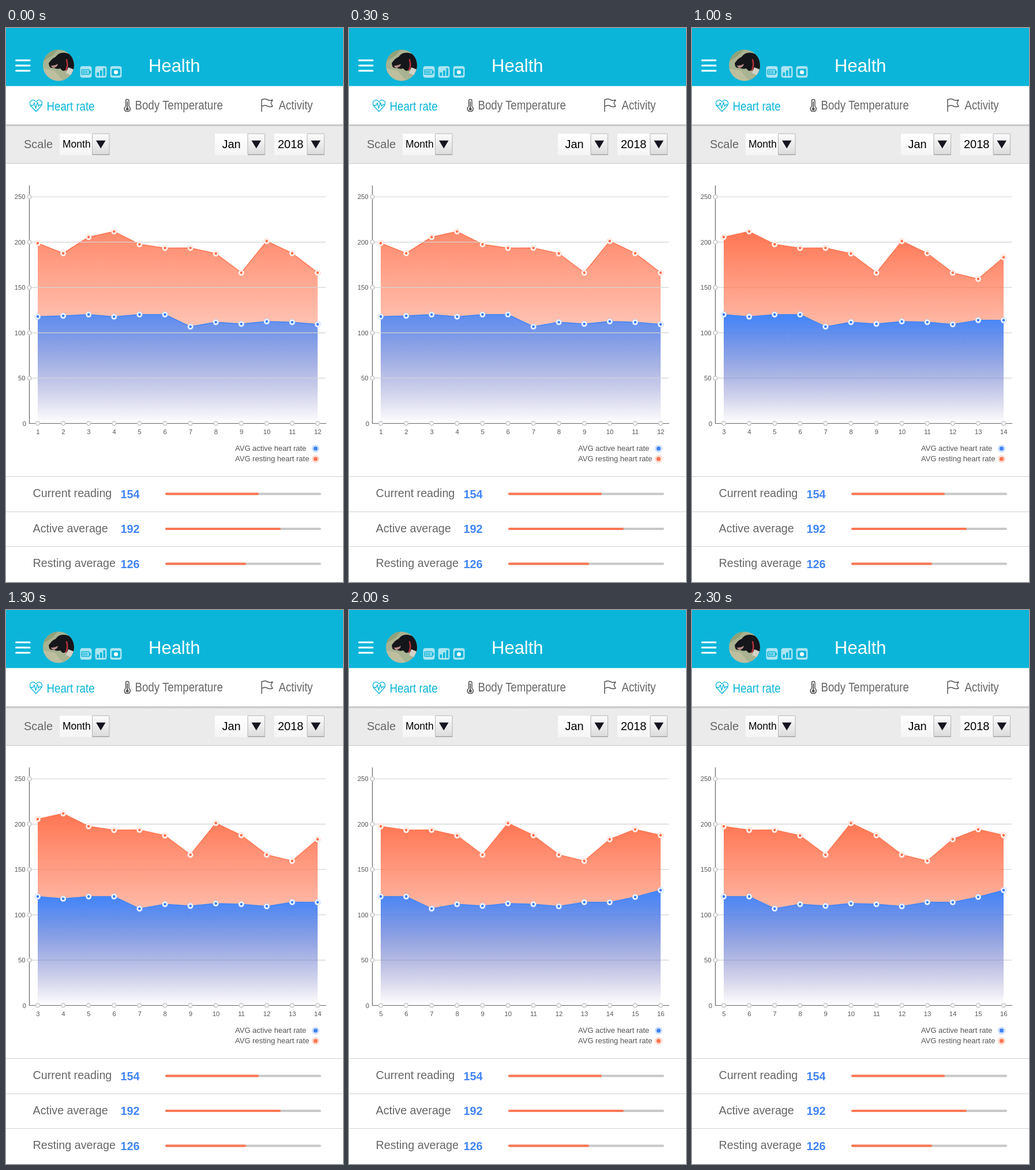
An HTML page for the animation above (2.5 s loop, 584x959 px).

```html
<!DOCTYPE html>
<html lang="en">
<head>
<meta charset="utf-8">
<title>Health</title>
<style>
  html, body { margin: 0; width: 100%; height: 100%; overflow: hidden; background: #fff; }
  svg { display: block; width: 584px; height: 959px; }
  text { font-family: "Liberation Sans", Arial, sans-serif; }
  .line { fill: none; stroke-linecap: round; stroke-linejoin: round; }
  .small { font-size: 11.3px; fill: #555; }
  .mid { text-anchor: middle; }
  .end { text-anchor: end; }
  .tab { font-size: 22px; fill: #666; }
  .legend { font-size: 13px; fill: #555; }
  .label { font-size: 19.7px; fill: #666; }
  .value { font-size: 19.8px; font-weight: bold; fill: #4285f4; }
</style>
</head>
<body>
<svg viewBox="0 0 584 959">
  <defs>
    <linearGradient id="rest" x2="0" y2="1">
      <stop stop-color="#ff7653"/><stop offset="1" stop-color="#ff7653" stop-opacity="0"/>
    </linearGradient>
    <linearGradient id="act" x2="0" y2="1">
      <stop stop-color="#4285fb"/><stop offset="1" stop-color="#4285fb" stop-opacity="0"/>
    </linearGradient>
    <linearGradient id="field" x2="0" y2="1">
      <stop stop-color="#fff"/><stop offset="1" stop-color="#f5f5f5"/>
    </linearGradient>
    <linearGradient id="button" x2="0" y2="1">
      <stop stop-color="#fcfcfc"/><stop offset="1" stop-color="#dcdcdc"/>
    </linearGradient>
    <linearGradient id="shade" x2="0" y2="1">
      <stop stop-color="#b4b4b4"/><stop offset="1" stop-color="#ebebeb"/>
    </linearGradient>
    <clipPath id="round"><circle cx="91" cy="64.5" r="27"/></clipPath>
  </defs>

  <!-- header -->
  <rect width="584" height="100.5" fill="#0bb5d9"/>
  <path d="M17.5 56H41M17.5 65H41M17.5 74H41" class="line" stroke="#fff" stroke-width="3"/>
  <g clip-path="url(#round)">
    <rect x="64" y="37" width="54" height="55" fill="#a9b391"/>
    <path d="M64 37H90L80 48L64 58Z" fill="#8fa27a"/>
    <path d="M64 70L84 74L100 92H64Z" fill="#bdbf9f"/>
    <path d="M74 61Q80 52 86 50Q92 41 103 43Q114 45 119 54V80Q110 79 105 71Q100 78 94 70Q88 72 83 69Q77 70 75 66Z" fill="#15161a"/>
    <path d="M77 65Q84 66 90 62Q89 69 81 69Z" fill="#b58c88"/>
    <path d="M105 55Q108 65 104 73" class="line" stroke="#b8343b" stroke-width="2.5"/>
    <path d="M108 68L118 72V84L104 78Z" fill="#d3d2c6"/>
  </g>
  <g fill="#a9e4f1">
    <rect x="128.5" y="66" width="20" height="20" rx="4"/>
    <rect x="154.5" y="66" width="20" height="20" rx="4"/>
    <rect x="180.5" y="66" width="20" height="20" rx="4"/>
  </g>
  <g fill="#0bb5d9">
    <rect x="130.5" y="71.5" width="14.5" height="9.5" rx="1.5"/>
    <rect x="145" y="74" width="1.8" height="4.5"/>
    <path d="M157.5 77h3.5v6h-3.5zM163 73.5h3.5v9.5h-3.5zM168.5 69.5h3.5v13.500h-3.500z"/>
    <rect x="183" y="70.500" width="15" height="12" rx="2"/>
  </g>
  <rect x="132" y="73" width="11.5" height="6.5" fill="#a9e4f1"/>
  <path d="M134 74v4.500M137 74v4.500M140 74v4.500" stroke="#0bb5d9" stroke-width="1.7"/>
  <circle cx="190.500" cy="76.500" r="3.600" fill="#fff"/>
  <text x="247" y="76" font-size="31" fill="#fff">Health</text>

  <!-- tabs -->
  <g class="line" stroke="#0bb5d9" stroke-width="1.300">
    <path d="M52 144.500L43.500 135.500Q39.500 130 43 126.500Q48 122 52 128Q56 122 61 126.500Q64.500 130 60.500 135.500Z"/>
    <path d="M42 134H47L49 129.500L51.500 139L54.500 128.500L56.500 135.500L58 133H62"/>
  </g>
  <g class="line" stroke="#555" stroke-width="1.500">
    <path d="M207.500 135.500V126Q207.500 123.500 210.200 123.500T213 126V135.500Q215.500 137.500 215.300 140.500Q214.500 144.500 210.200 144.500T205.200 140.500Q205 137.500 207.500 135.500Z"/>
    <path d="M210.200 128V138" stroke-width="1.800"/>
    <path d="M443 124V144.500M443 124.500Q448 121.500 452.500 124T462 124.500L459 130L462 135.500Q457 137.500 452.500 135T443 136"/>
  </g>
  <circle cx="210.200" cy="140.300" r="2.500" fill="#555"/>
  <g id="tabs"></g>

  <!-- filter bar -->
  <rect y="167" width="584" height="68" fill="#ebebeb"/>
  <rect y="167" width="584" height="4" fill="url(#shade)"/>
  <path d="M0 234.500H584" stroke="#cbcbcb"/>
  <text x="31" y="208" font-size="20" fill="#666">Scale</text>
  <g id="picks"></g>

  <g id="chart"></g>

  <!-- legend and readings -->
  <text x="397" y="732" class="legend">AVG active heart rate</text>
  <text x="397" y="750" class="legend">AVG resting heart rate</text>
  <g id="keys"></g>
  <g id="readings"></g>
</svg>
<script>
const ORANGE = "#ff7653", BLUE = "#4285f4";
const STEP = 500, STEPS = 5, SHOWN = 12;
const BASE = 684.5, LEFT = 55, GAP = 485 / 11;

// Heart rates for each month, as heights on the stage
const resting = [372.5, 390, 362, 352.3, 374.5, 381, 380.8, 390.5, 423.7, 369, 390, 423.7, 434.5, 397, 379.8, 390];
const active = [499.5, 498.3, 496, 499.8, 496, 496, 517, 509.3, 512.3, 508, 509.3, 513, 505.8, 506, 496.8, 485];

const put = (id, html) => { document.getElementById(id).innerHTML = html; };
const text = (x, y, cls, s) => `<text x="${x}" y="${y}" class="${cls}">${s}</text>`;
const disc = (x, y, r, fill, extra = "") => `<circle cx="${x}" cy="${y}" r="${r}" fill="${fill}" ${extra}/>`;
const ring = (x, y) => disc(x, y, 3.4, "#fff", 'stroke="#d0d0d0" stroke-width="2"');
const xAt = i => LEFT + i * GAP;

// Condensed face for the tab names
put("tabs", [["Heart rate", 70.5, 143, "#0bb5d9"], ["Body Temperature", 223.5, 140.5, "#666"], ["Activity", 472.500, 140.5, "#666"]]
  .map(([s, x, y, fill]) =>
    `<text class="tab" transform="translate(${x} ${y}) scale(.85 1)" style="fill:${fill}">${s}</text>`).join(""));

put("picks", [["Month", 93, 149, 98, 17.5], ["Jan", 362, 418.5, 374.5, 20], ["2018", 465, 521.5, 471, 20]]
  .map(([s, x, split, tx, size]) => `
    <rect x="${x}" y="183" width="${split - x}" height="37" fill="url(#field)"/>
    <rect x="${split + .5}" y="183" width="29.500" height="36" rx="1" fill="url(#button)" stroke="#b5b5b5"/>
    <path d="M${split + .5} 219.300h30" stroke="#999"/>
    <path d="M${split + 7} 194.800h16.500l-8.250 13.700z" fill="#15151f"/>
    <text x="${tx}" y="${size < 20 ? 207 : 208}" font-size="${size}">${s}</text>`).join(""));

put("keys", [[728, BLUE, "#b5d0fc"], [746, ORANGE, "#ffc9ba"]].map(([y, dot, halo]) =>
  disc(536.5, y, 5.6, "#fff", `stroke="${halo}" stroke-width="1.4"`) + disc(536.5, y, 3.8, dot)).join(""));

const bar = (x, y, color) => `<path d="M278 ${y}H${x}" class="line" stroke="${color}" stroke-width="4"/>`;
put("readings", [["Current reading", 154, 438], ["Active average", 192, 476], ["Resting average", 126, 416]]
  .map(([name, value, end], i) => {
    const y = 776.5 + i * 60.5;
    return `<path d="M0 ${Math.floor(y) + .5}H584" stroke="#d2d2d2"/>`
      + text(46.5, y + 35.5, "label", name) + text(198.5, y + 37.3, "value", value)
      + bar(544, y + 30, "#c8c8c8") + bar(end - 2, y + 30, "#fb7855");
  }).join(""));

function area(ys, fill, color, opacity) {
  const line = "M" + ys.map((y, i) => `${xAt(i)} ${y}`).join("L");
  return `<path d="${line}V${BASE}H${LEFT}Z" fill="url(#${fill})" opacity="${opacity}"/>
    <path d="${line}" class="line" stroke="${color}" stroke-width="1.5"/>`;
}

const dots = (ys, color, halo) => ys.map((y, i) =>
  disc(xAt(i), y, 5.2, halo) + disc(xAt(i), y, 4.2, "#fff") + disc(xAt(i), y, 2.4, color)).join("");

function draw(step) {
  const rest = resting.slice(step, step + SHOWN), act = active.slice(step, step + SHOWN);
  const first = step === 0, opacity = first ? .86 : 1;
  let grid = "", ticks = "";
  for (let v = 0; v <= 250; v += 50) {
    const y = BASE - v * 1.569;
    if (v) {
      grid += `<path d="M41 ${y}H554" stroke="#d3d3d3" stroke-width="1.2"/>`;
      ticks += ring(40.5, y);
    }
    ticks += text(v ? 33.5 : 35, y + 4, "small end", v);
  }
  for (let i = 0; i < SHOWN; i++)
    ticks += ring(xAt(i), BASE) + text(xAt(i) + .3, 703, "small mid", step + i + 1);

  const areas = area(rest, "rest", ORANGE, opacity) + area(act, "act", BLUE, opacity);
  put("chart", (first ? areas + grid : grid + areas)
    + `<path d="M40.500 272.500V${BASE}H555" fill="none" stroke="#666" stroke-width="1.2"/>`
    + ticks + dots(rest, ORANGE, "#ffd0c3") + dots(act, BLUE, "#b9d3ff"));
}

const start = performance.now();
let shown = -1;
function tick() {
  const step = Math.floor((performance.now() - start) / STEP) % STEPS;
  if (step !== shown) draw(shown = step);
  requestAnimationFrame(tick);
}
tick();
</script>
</body>
</html>
```
